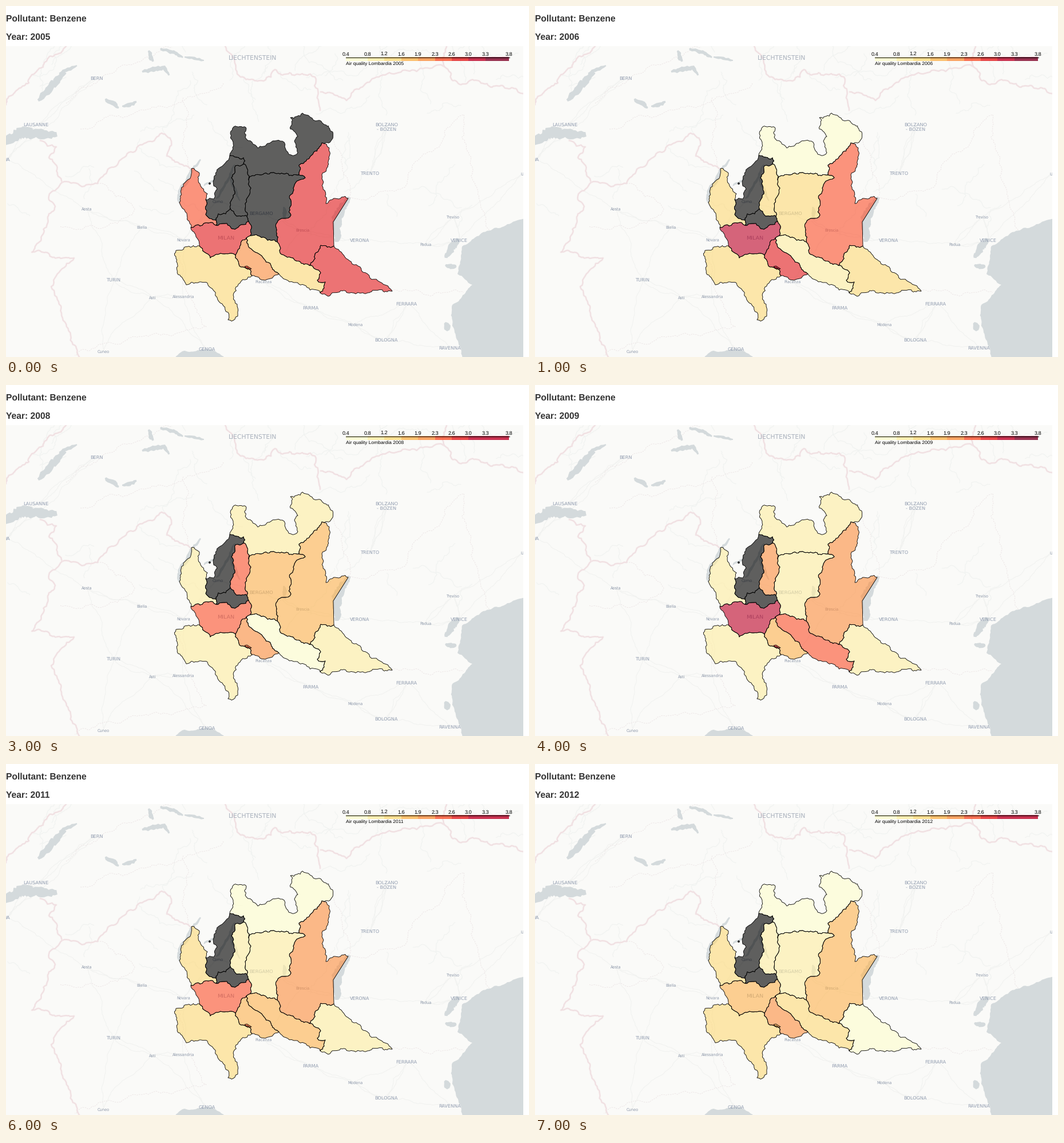
A matplotlib script for the animation above (8 s loop, 914x613 px).

```python
import numpy as np
import matplotlib.pyplot as plt
from matplotlib.animation import FuncAnimation
from matplotlib.patches import Circle, Polygon, Rectangle

plt.rcParams["text.hinting"] = "none"
W, H, DPI = 914, 613, 100
MAP_RIGHT, MAP_TOP = 904, 70
PX = 72 / DPI
LAND, WATER = "#fafaf8", "#d4dadc"
FILLS = ["#ffffcc", "#ffeda0", "#fed976", "#feb24c", "#fd8d3c",
         "#fc4e2a", "#e31a1c", "#bd0026", "#800026"]
OUT = "outside"
rng = np.random.default_rng(7)

fig = plt.figure(figsize=(W / DPI, H / DPI), dpi=DPI, facecolor="white")
ax = fig.add_axes([0, 0, 1, 1])
ax.set_xlim(0, W)
ax.set_ylim(H, 0)
ax.axis("off")


# ---- helpers --------------------------------------------------------------
def rough(points, amount=0.24, cap=3, grain=4.5):
    """Split long segments, pushing each new midpoint sideways at random."""
    p = [np.array(q, float) for q in points]
    i = 0
    while i < len(p) - 1:
        dx, dy = p[i + 1] - p[i]
        size = np.hypot(dx, dy)
        if size <= grain:
            i += 1
            continue
        push = rng.uniform(-1, 1) * min(amount * size, cap) / size
        p.insert(i + 1, (p[i] + p[i + 1]) / 2 + push * np.array([-dy, dx]))
    return np.array(p)


def stroke(points, color, width, z=2, **style):
    ax.plot(*np.transpose(points), color=color, lw=width * PX, zorder=z, **style)


def area(points, color, z, **style):
    return ax.add_patch(Polygon(points, fc=color, **{"ec": "none", **style}, zorder=z))


def lake(width, *spine):
    """A ragged strip along the spine, tapering at both ends."""
    p = rough(spine, 0.15, 2)
    step = np.gradient(p, axis=0)
    normal = np.column_stack([-step[:, 1], step[:, 0]])
    normal /= np.hypot(*step.T)[:, None]
    half = width / 2 * np.sin(np.linspace(0.15, np.pi - 0.15, len(p))) ** 0.5
    side = normal * (half * rng.uniform(0.75, 1.1, len(p)))[:, None]
    area(np.vstack([p + side, (p - side)[::-1]]), WATER, 3)


def text(x, y, s, size, color, z=20, **style):
    style = {"family": "Liberation Sans", "va": "baseline", **style}
    return ax.text(x, y, s, fontsize=size * PX, color=color, zorder=z, **style)


def box(x, y, w, h, color, z):
    return ax.add_patch(Rectangle((x, y), w, h, fc=color, ec="none", zorder=z))


# ---- base map -------------------------------------------------------------
CITIES = [
    ("BERN", 158, 126), ("LAUSANNE", 52, 208), ("BOLZANO", 665, 208),
    ("- BOZEN", 665, 216), ("TRENTO", 636, 293), ("VENICE", 792, 410),
    ("VERONA", 618, 410), ("FERRARA", 700, 520), ("BOLOGNA", 664, 584),
    ("RAVENNA", 776, 597), ("PARMA", 532, 527), ("GENOA", 351, 600),
    ("TURIN", 188, 478), ("BERGAMO", 446, 363), ("VA", 2, 268),
]
TOWNS = [
    ("Treviso", 781, 368), ("Padua", 733, 416), ("Modena", 610, 556),
    ("Cuneo", 170, 603), ("Alessandria", 310, 507), ("Asti", 256, 509),
    ("Novara", 310, 408), ("Biella", 237, 386), ("Aosta", 141, 354),
    ("Brescia", 518, 391), ("Como", 370, 341), ("Piacenza", 450, 481),
    ("U", 902, 293),
]


def draw_labels():
    style = {"family": "DejaVu Sans", "ha": "center", "z": 4}
    text(431, 93.5, "LIECHTENSTEIN", 10.7, "#a9b1bd", **style)
    text(384, 408, "MILAN", 9.5, "#939eb1", **style)
    for name, x, y in CITIES:
        text(x, y + 3, name, 8.15, "#939eb1", **style)
    for name, x, y in TOWNS:
        text(x, y + 2.5, name, 6.7, "#8d98aa", **style)


def draw_roads():
    """Join every place to its two nearest neighbours."""
    places = np.array([p[1:] for p in CITIES + TOWNS], float)
    for a in places:
        near = np.argsort(np.hypot(*(places - a).T))[1:3]
        for b in places[near]:
            stroke(rough([a, b], 0.1, 8), "#f1f2f0", 1, z=1)


def draw_valleys():
    """Faint wandering lines, mostly over the mountains in the north."""
    for _ in range(45):
        x, y = rng.uniform(0, MAP_RIGHT), MAP_TOP + 300 * rng.random() ** 1.3
        turn, size = rng.uniform(0, 2 * np.pi), rng.uniform(40, 110)
        end = x + size * np.cos(turn), y + size * np.sin(turn)
        stroke(rough([(x, y), end], 0.25, 14), "#f1f3f1", 1.2, z=1)


def border(*points):
    p = rough(points, 0.2, 5)
    stroke(p, "#f5e9ea", 3)
    stroke(p, "#ecd9dc", 0.8)


def region(*points):
    stroke(rough(points, 0.2, 6), "#ebe3e4", 0.8, ls=(0, (3, 2)))


def draw_borders():
    border((0, 172), (50, 118), (105, 70))
    border((60, 235), (88, 246), (75, 265), (98, 308), (160, 310), (178, 285),
           (272, 222), (289, 236), (281, 262), (322, 284))
    border((98, 308), (76, 328), (86, 350), (45, 430), (119, 440), (79, 490),
           (103, 552), (128, 613))
    border((383, 70), (410, 124), (450, 131), (470, 111), (540, 124), (549, 182))
    border((550, 150), (595, 165), (640, 127), (764, 105))
    border((770, 70), (766, 106), (790, 135), (870, 141), (904, 153))
    region((160, 310), (225, 355), (195, 380), (95, 385))
    region((300, 430), (312, 488), (350, 560), (190, 590), (120, 610))
    region((571, 225), (598, 336), (690, 320), (720, 270), (800, 190))
    region((675, 498), (800, 500))
    region((130, 215), (250, 180), (380, 135))
    region((105, 170), (190, 115), (290, 72))
    region((310, 160), (315, 260), (330, 300))
    region((800, 190), (815, 290), (845, 392))


def draw_water():
    coast = [(925, 366), (870, 385), (820, 404), (797, 420), (789, 468), (815, 487),
             (780, 522), (784, 570), (797, 620)]
    area(np.vstack([rough(coast, 0.12), (925, 620)]), WATER, 3)
    shore = [(290, 620), (312, 602), (358, 599), (385, 620)]
    area(rough(shore, 0.12), WATER, 3)
    lake(14, (790, 406), (778, 422), (769, 440))
    lake(9, (768, 452), (787, 454))
    lake(12, (767, 553), (773, 567))
    lake(20, (-8, 240), (30, 221), (89, 224))
    lake(14, (56, 165), (104, 116))
    lake(6, (93, 118), (124, 104))
    lake(8, (174, 162), (197, 178))
    lake(7, (203, 175), (228, 167))
    lake(9, (238, 115), (276, 107), (285, 121))
    lake(8, (249, 78), (257, 97))
    lake(7, (270, 74), (309, 90))
    lake(5, (312, 89), (346, 95))
    lake(7, (340, 268), (304, 323), (303, 344))
    lake(5, (346, 314), (366, 301))
    lake(5, (400, 277), (392, 293), (409, 340))
    lake(5, (392, 296), (367, 336))
    lake(7, (485, 351), (489, 373))
    lake(17, (600, 334), (578, 370), (578, 412))


# ---- provinces: each border is drawn up once and shared -------------------
edges = []


def edge(a, b, *points, **style):
    edges.append(({a, b}, rough(points, **style)))


edge("VA", OUT, (323, 387), (317, 370), (303, 343), (306, 321), (323, 298), (324, 284),
     (338, 294), (336, 304), (352, 328), (349, 338))
edge("VA", "CO", (349, 338), (349, 364), (367, 374))
edge("VA", "MB", (367, 374), (367, 383))
edge("VA", "MI", (367, 383), (354, 379), (323, 387))
edge("CO", OUT, (349, 338), (363, 337), (369, 320), (362, 306), (371, 284), (391, 261))
edge("CO", "SO", (391, 261), (415, 265), (415, 276))
edge("CO", "LC", (415, 276), (401, 279), (394, 300), (400, 328), (392, 354))
edge("CO", "MB", (392, 354), (384, 363), (371, 363), (367, 374))
edge("LC", "MB", (392, 354), (401, 365), (421, 367))
edge("LC", "BG", (421, 367), (418, 345), (428, 318), (424, 303))
edge("LC", "SO", (424, 303), (422, 291), (415, 276))
edge("SO", "BG", (424, 303), (446, 295), (490, 292), (512, 295))
edge("SO", "BS", (512, 295), (512, 278), (538, 255), (552, 239))
edge("SO", OUT, (391, 261), (397, 238), (392, 222), (398, 211), (419, 212), (418, 229),
     (440, 248), (457, 240), (483, 236), (498, 260), (510, 256), (504, 236), (510, 228),
     (497, 215), (497, 195), (518, 187), (545, 200), (571, 220), (569, 234), (552, 239))
edge("BG", "BS", (512, 295), (523, 300), (508, 306), (502, 318), (498, 365), (474, 378),
     (474, 412))
edge("BG", "CR", (474, 412), (453, 405), (427, 401))
edge("BG", "MB", (421, 367), (424, 376))
edge("BG", "MI", (424, 376), (429, 388), (427, 401))
edge("MI", "MB", (424, 376), (400, 390), (380, 380), (367, 383))
edge("MI", "CR", (427, 401), (420, 405))
edge("MI", "LO", (420, 405), (412, 410), (401, 435))
edge("MI", "PV", (401, 435), (375, 432), (357, 440), (338, 419))
edge("MI", OUT, (338, 419), (332, 403), (323, 387))
edge("LO", "PV", (401, 435), (407, 451), (427, 461), (430, 471))
edge("LO", OUT, (430, 471), (453, 479), (477, 468))
edge("LO", "CR", (420, 405), (425, 422), (452, 443), (477, 468))
edge("CR", OUT, (477, 468), (503, 483), (549, 501))
edge("CR", "MN", (530, 453), (550, 466), (544, 479), (558, 482), (549, 501))
edge("BS", "CR", (474, 412), (478, 427), (513, 446), (530, 453))
edge("BS", "MN", (530, 453), (550, 418), (573, 419))
edge("BS", OUT, (552, 239), (565, 248), (560, 285), (552, 295), (559, 345), (575, 336),
     (598, 336))
edge("BS", OUT, (598, 336), (572, 377), (573, 419), amount=0)
edge("MN", OUT, (573, 419), (583, 428), (624, 465), (650, 480), (675, 498), (606, 501),
     (585, 497), (563, 507), (549, 501))
edge("PV", OUT, (338, 419), (297, 427), (304, 470), (315, 487), (352, 484), (370, 513),
     (388, 535), (388, 548), (400, 547), (404, 521), (398, 508), (406, 486), (430, 471))


def outline(name):
    """Chain all borders of a province end to end."""
    left = [p for pair, p in edges if name in pair]
    ring = left.pop()
    while left:
        for i, p in enumerate(left):
            p = p if np.allclose(p[0], ring[-1]) else p[::-1]
            if np.allclose(p[0], ring[-1]):
                ring = np.vstack([ring, p[1:]])
                left.pop(i)
                break
    return ring


def province(points):
    area(points, "none", 7, ec="black", lw=0.85 * PX, joinstyle="round")
    return area(points, "black", 6)


# One colour class per province and year; "-" means no data.
ORDER = "VA CO LC MB SO BG BS MI LO CR MN PV".split()
CLASSES = {
    2005: "5-----664262",
    2006: "2-2-02576122",
    2007: "0-2-01476002",
    2008: "1-5-13354011",
    2009: "1-4-11473511",
    2010: "1-2-01463412",
    2011: "2-1-01453312",
    2012: "2-1-01334202",
}
YEARS = list(CLASSES)

box(0, MAP_TOP, MAP_RIGHT, H - MAP_TOP, LAND, 0)
draw_valleys()
draw_roads()
draw_borders()
draw_water()
draw_labels()
fills = {name: [province(outline(name))] for name in ORDER}
exclave = [(417, 455), (421, 454), (429, 459), (422, 460)]
fills["MI"].append(province(exclave))
ax.add_patch(Circle((356, 310), 1.4, fc="#444444", ec="black", lw=0.8 * PX, zorder=7))

# ---- page margins, legend and headings ------------------------------------
box(0, 0, W, MAP_TOP, "white", 10)
box(MAP_RIGHT, 0, W - MAP_RIGHT, H, "white", 10)

values = np.array([0.4, *(0.849 + 0.3516 * np.arange(8)), 3.8])
ticks = 594 + 285 * (values - 0.4) / 3.4
bars = [box(a, 89, b - a, 7, c, 11) for a, b, c in zip(ticks, ticks[1:], FILLS)]
for bar in bars:
    bar.set_alpha(0.8)
stroke([(593.5, 89.5), (879.5, 89.5)], "black", 1, z=12)
for x, v in zip(ticks, values):
    text(x, 86.5, f"{v:.1f}", 9.2, "black", ha="center")

caption = text(593.5, 103.5, "", 8.5, "black")
text(0, 27.2, "Pollutant: Benzene", 15.6, "#333333", weight="bold")
heading = text(0, 58.8, "", 15.6, "#333333", weight="bold")


def update(i):
    year = YEARS[i]
    heading.set_text(f"Year: {year}")
    caption.set_text(f"Air quality Lombardia {year}")
    for name, c in zip(ORDER, CLASSES[year]):
        for patch in fills[name]:
            patch.set_facecolor("black" if c == "-" else FILLS[int(c)])
            patch.set_alpha(0.62 if c == "-" else 0.6)
    # The darkest bar shows only in years with high readings.
    high = any(c in "678" for c in CLASSES[year])
    bars[-1].set_facecolor(FILLS[8 if high else 7])
    return []


anim = FuncAnimation(fig, update, frames=len(YEARS), init_func=lambda: update(0),
                     interval=1000, repeat=True, repeat_delay=0, blit=False)
plt.show()
```
